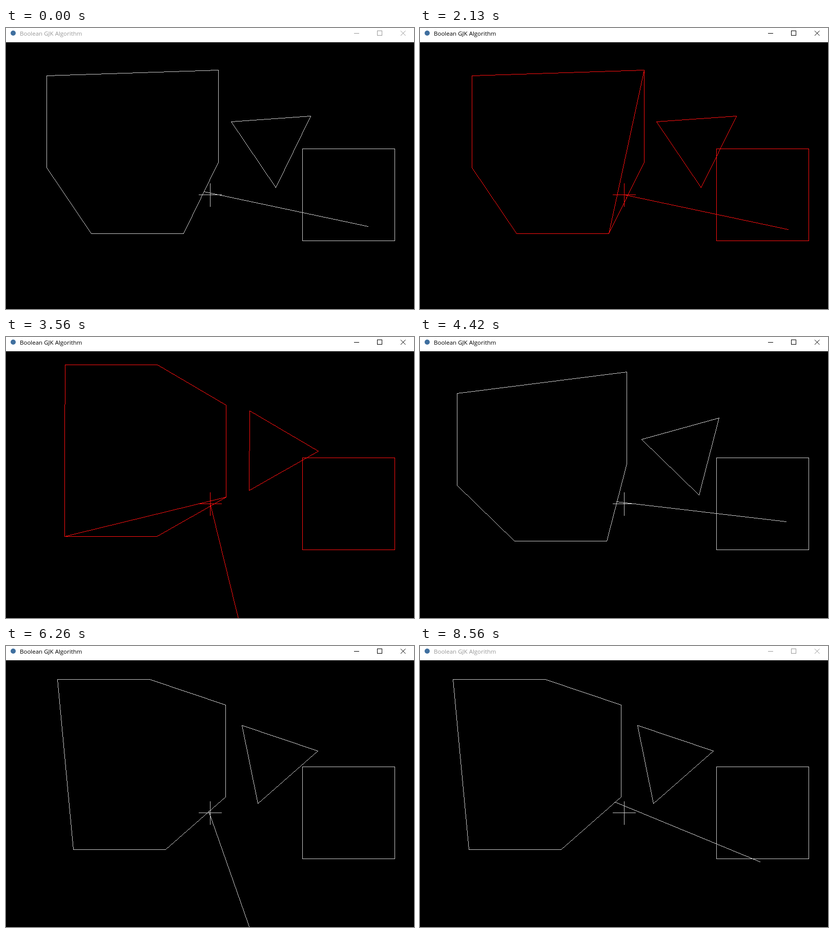
An HTML page with a canvas that plays this animation: 796x550 px, repeating every 8660 ms.

```html
<!DOCTYPE html>
<html lang="en">
<head>
<meta charset="utf-8">
<title>Boolean GJK Algorithm</title>
<style>
html, body { margin: 0; width: 100%; height: 100%; overflow: hidden; background: #000; }
canvas { position: absolute; left: 0; top: 0; display: block; }
header {
  position: absolute; left: 0; top: 0; width: 796px; height: 28px;
  box-sizing: border-box; background: #fff; border-bottom: 1px solid #f0f0f0;
  color: #000; font: 11.5px/16px "Open Sans", "Noto Sans", sans-serif;
}
header.idle { color: #999; }
header span { position: absolute; left: 27px; top: 3px; white-space: pre; }
header svg { position: absolute; left: 0; top: 0; }
</style>
</head>
<body>
<canvas id="stage" width="796" height="550"></canvas>
<header id="bar">
  <svg width="796" height="27" fill="none" stroke="currentColor">
    <circle cx="14" cy="10" r="5" fill="#3f6f9f" stroke="none"/>
    <path d="M679 10.5H689M724.5 5.5H733.5V14.5H724.5Z" shape-rendering="crispEdges"/>
    <path d="M770 5.5L779.5 15M779.5 5.5L770 15"/>
  </svg>
  <span>Boolean GJK Algorithm</span>
</header>
<script>
const LOOP = 8660, STEP = 4.5, TURN = 0.05, RADIUS = 90;
const ORIGIN = { x: 398, y: 326 }, CENTER = { x: 519.47, y: 222.55 };
const BOX = { l: 578, t: 236, r: 758, b: 416 };

// [time, steps to the right, turns]
const POSES = [
  [0, 0, 0], [890, 1, 0], [1390, 3, 0], [1510, 7, 0], [1630, 9, 0],
  [2130, 5, 0], [2250, 1, 0], [2370, 0, 1], [2890, 0, 4], [3020, 0, 8],
  [3160, 0, 12], [3280, 0, 13], [3560, 0, 12]
];
// key held down: steady turning back
for (let i = 0; i < 10; i++) POSES.push([3940 + 120 * i, 0, Math.round(11 - 3.7 * i)]);
POSES.push(
  [5390, 0, -23], [5900, 0, -25], [6020, 0, -29], [6140, 0, -32], [6260, 0, -34],
  [6510, 1, -34], [6630, 2, -34], [6880, 3, -34], [7130, 2, -34],
  [7630, -2, -34], [7780, -7, -34], [7900, -8, -34]
);

const ctx = document.getElementById("stage").getContext("2d");
const bar = document.getElementById("bar");

const sub = (a, b) => ({ x: a.x - b.x, y: a.y - b.y });
const add = (a, b) => ({ x: a.x + b.x, y: a.y + b.y });
const neg = a => ({ x: -a.x, y: -a.y });
const dot = (a, b) => a.x * b.x + a.y * b.y;
const cross = (a, b) => a.x * b.y - a.y * b.x;

// normal of edge ab on the side of vector v
function normal(a, b, v) {
  const e = sub(b, a), n = { x: -e.y, y: e.x };
  return dot(n, v) >= 0 ? n : neg(n);
}

function triangle(steps, turns) {
  return [0, 1, 2].map(i => {
    const a = 1.5 + TURN * turns - (i + 1) * Math.PI * 2 / 3;
    return {
      x: CENTER.x + STEP * steps + RADIUS * Math.cos(a),
      y: CENTER.y + RADIUS * Math.sin(a)
    };
  });
}

// triangle minus square, relative to the origin
function difference(tri) {
  return tri.flatMap((p, i) => [BOX.l, BOX.r].flatMap(x =>
    [BOX.t, BOX.b].map(y => ({ x: p.x - x, y: p.y - y, i }))));
}

function hullOf(points) {
  const sorted = [...points].sort((a, b) => a.x - b.x || a.y - b.y);
  const chain = list => {
    const out = [];
    for (const p of list) {
      while (out.length > 1 && cross(sub(out.at(-1), out.at(-2)), sub(p, out.at(-1))) <= 0) out.pop();
      out.push(p);
    }
    return out.slice(0, -1);
  };
  const hull = [...chain(sorted), ...chain(sorted.reverse())];
  // the outline cuts the shallow corner where one side of the triangle ends
  const n = hull.length;
  const k = hull.findIndex((p, j) => p.i === 0 && hull[(j + n - 1) % n].i === 1);
  if (k >= 0) {
    const e = sub(hull[k], hull[(k + n - 1) % n]), f = sub(hull[(k + 1) % n], hull[k]);
    if (Math.atan2(cross(e, f), dot(e, f)) < 0.35) hull.splice(k, 1);
  }
  return hull;
}

function gjk(points) {
  const support = d => points.reduce((m, p) => dot(p, d) > dot(m, d) ? p : m);
  let dir = { x: 1, y: -1 }, last = dir, simplex = [];
  for (let i = 0; i < 20; i++) {
    const a = support(dir);
    if (simplex.includes(a)) break;
    last = dir;
    simplex.push(a);
    const ao = neg(a);
    if (simplex.length === 1) { dir = ao; continue; }
    if (simplex.length === 2) { dir = normal(simplex[0], a, ao); continue; }
    const [c, b] = simplex;
    const ab = normal(a, b, sub(a, c)), ac = normal(a, c, sub(a, b));
    if (dot(ab, ao) > 0) { simplex = [b, a]; dir = ab; }
    else if (dot(ac, ao) > 0) { simplex = [c, a]; dir = ac; }
    else return { hit: true, simplex, dir: last };
  }
  return { hit: false, simplex, dir: last };
}

// point of the outline closest to the origin
function closest(hull) {
  let best = null;
  hull.forEach((a, i) => {
    const e = sub(hull[(i + 1) % hull.length], a);
    const t = Math.max(0, Math.min(1, -dot(a, e) / dot(e, e)));
    const p = { x: a.x + e.x * t, y: a.y + e.y * t };
    if (!best || dot(p, p) < dot(best, best)) best = p;
  });
  return best;
}

// hard-edged line, one pixel wide
function line(a, b) {
  let x = Math.round(a.x), y = Math.round(a.y);
  const x1 = Math.round(b.x), y1 = Math.round(b.y);
  const dx = Math.abs(x1 - x), dy = Math.abs(y1 - y);
  const sx = Math.sign(x1 - x), sy = Math.sign(y1 - y);
  let err = dx - dy;
  for (let n = Math.max(dx, dy); n >= 0; n--) {
    ctx.fillRect(x, y, 1, 1);
    const e = 2 * err;
    if (e > -dy) { err -= dy; x += sx; }
    if (e < dx) { err += dx; y += sy; }
  }
}

const outline = pts => pts.forEach((p, i) => line(p, pts[(i + 1) % pts.length]));
const place = pts => pts.map(p => add(p, ORIGIN));

function draw(steps, turns) {
  const tri = triangle(steps, turns), points = difference(tri);
  const hull = hullOf(points), { hit, simplex, dir } = gjk(points);
  ctx.fillStyle = "#000";
  ctx.fillRect(0, 0, 796, 550);
  ctx.fillStyle = hit ? "#ff1010" : "#c8c8c8";
  const { l, t, r, b } = BOX, { x, y } = ORIGIN;
  outline([{ x: l, y: t }, { x: r, y: t }, { x: r, y: b }, { x: l, y: b }]);
  outline(tri);
  outline(place(hull));
  line({ x: x - 22, y }, { x: x + 22, y });
  line({ x, y: y - 22 }, { x, y: y + 23 });
  if (hit) outline(place(simplex));
  const start = hit ? ORIGIN : add(closest(hull), ORIGIN);
  line(start, add(start, dir));
}

let shown = null;
function tick(now) {
  const t = now % LOOP;
  const pose = POSES.findLast(p => p[0] <= t);
  bar.className = t < 250 || t >= 8560 ? "idle" : "";
  if (pose !== shown) {
    shown = pose;
    draw(pose[1], pose[2]);
  }
}

const begin = performance.now();
function frame() {
  tick(performance.now() - begin);
  requestAnimationFrame(frame);
}
frame();
</script>
</body>
</html>
```
